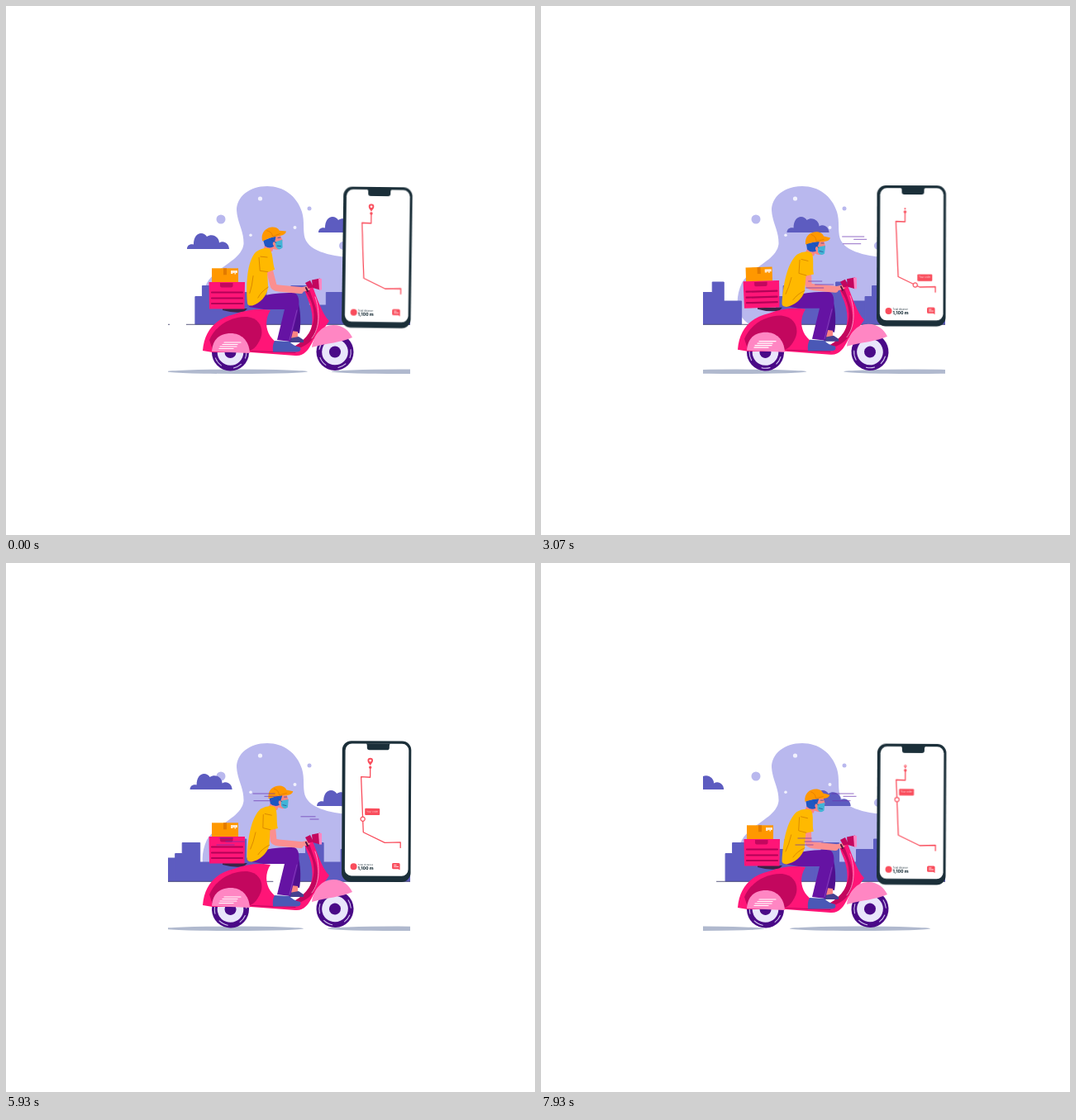
An HTML page for the animation above (8 s loop, 640 by 640 pixels).

```html
<!DOCTYPE html>
<html lang="en">
<head>
<meta charset="utf-8">
<title>Scooter delivery</title>
<style>
  html, body { margin: 0; width: 100%; height: 100%; overflow: hidden; background: #fff; }
  svg { display: block; width: 100%; height: 100%; }
  text { font-family: Inter, Arial, sans-serif; }
  .lav { fill: #b9b8ee; }
  .blue { fill: #5d5cc0; }
  .pink { fill: #ff1577; }
  .dark { fill: #c3075e; }
  .light { fill: #ff86c3; }
  .red { fill: #f94d5c; }
  .skin { fill: #fb8583; }
  .tyre { fill: #4a0a87; }
  .fine { fill: none; stroke-linecap: round; stroke-linejoin: round; }
</style>
</head>
<body>
<svg viewBox="0 0 640 640">
  <defs>
    <clipPath id="view"><rect x="196" y="200" width="293" height="260"/></clipPath>
    <path id="cloud" class="blue" d="M0 19C0 15 3 12.500 8 13.500C8 5 12 0 17 0C20 0 23 2 24 4C31 -1 39 5 39 11.500C44 8 51 12 51 19Z"/>
    <g id="wheel">
      <circle class="tyre" r="22.5"/>
      <circle r="15.8" fill="#e9e6fb"/>
      <circle class="tyre" r="7"/>
      <path class="fine" stroke="#d9ccf5" d="M-18 7A19.3 19.3 0 0 0-11 16M4 18.9A19.3 19.3 0 0 0 13 14.3M18 7A19.3 19.3 0 0 0 19 -3M-19 -3A19.3 19.3 0 0 1-14 -13"/>
    </g>
    <g id="streaksTop"><path d="M0 279h27M14 282.3h16M1 287.7h22"/></g>
    <g id="streaksMid"><path d="M0 306.8h18M11 310h11"/></g>
    <g id="streaksLow"><path d="M0 333h17M8 337h23M-3 341h22"/></g>
  </defs>

  <g clip-path="url(#view)">
    <path class="lav" d="M316 218C294 218 279 231 279 247C280 263 288 272 287.500 288C285 308 255 315 243 335C234 355 236 375 252 385H262C285 382 292 364 318 363L430 366V306C400 303 372 300 363 284C358 274 362 262 358 249C352 230 336 218 316 218Z"/>
    <g class="lav">
      <circle cx="260" cy="258" r="5.5"/><circle cx="367" cy="245" r="2.5"/><circle cx="408" cy="290" r="5"/>
    </g>
    <g fill="#f1f1fd">
      <circle cx="307.5" cy="233" r="2.6"/><circle cx="349.5" cy="268" r="2"/><circle cx="296" cy="277.3" r="1.8"/>
    </g>
    <g id="clouds"></g>
    <g id="town"></g>
    <g id="ground" fill="#b0b9ce"></g>
  </g>

  <g transform="translate(271.5 419)"><use id="rear" href="#wheel"/></g>
  <g transform="translate(398 418.5)"><use id="front" href="#wheel"/></g>

  <g id="bike">
    <path fill="#3a2447" d="M262 366H292L288 370Q276 372 262 368Z"/>
    <g id="cargo">
      <rect x="249" y="317.3" width="32" height="17" fill="#ff9800"/>
      <path fill="#e27a00" d="M263 317.3h4v8h-4z"/>
      <path fill="#ffe9cf" d="M272 320h8v3h-2v1.5h-1.500v-1.500h-2v1h-2.500z"/>
      <path class="pink" d="M245.500 334H289L288.500 366.500H246Z"/>
      <path class="dark" d="M259 335h15.500v3.500q0 2-2 2h-11.500q-2 0-2-2z"/>
      <path class="fine" stroke="#b40258" stroke-width="2.2" d="M249 346.500h37M249 353.500h37M249 360h37"/>
    </g>
    <path class="pink" d="M238 417C240 392 254 378 276 373C292 367 306 366 320 368C310 384 316 402 332 410L350 411C372 402 376 378 364 352L361 343L370 337C376 352 382 372 391 381C384 392 380 396 372 404C366 417 360 424 350 423L296 419L250 419Z"/>
    <path class="dark" d="M246 404C255 384 275 375 292 376C308 378 312 392 308 402C304 412 298 417 292 418L250 416Z"/>
    <path class="light" d="M249 418C250 402 260 396 272 396C284 396 294 404 295 420Z"/>
    <path class="fine" stroke="#fff" stroke-width="1.2" d="M264 407h20M262 409.500h18M259 412h20M258 414.500h17"/>
    <path class="dark" d="M362 345C375 362 381 393 349 412L357 413C378 405 382 382 372 357L367 343Z"/>
    <path class="fine" stroke="#ffb2d8" stroke-width=".8" d="M374 352C380 368 380 390 370 402"/>
    <path class="light" d="M370 413C372 398 382 386 396 386C408 386 415 393 419 401C406 407 388 408 370 413Z"/>
    <path class="fine" stroke="#b40258" stroke-width=".8" d="M297 417.500L350 419.500"/>

    <path fill="#50108f" d="M342 349C356 344 358 380 355 396L344 394Z"/>
    <path class="skin" d="M345 393L353 394L353 403L344 403Z"/>
    <path fill="#45418f" d="M343 402L354 400L360 404V407H342Z"/>
    <path fill="#6513a3" d="M294 364C302 352 312 347 349 347C356 350 355 362 353 370L344 406L328 404L337 367L312 367Z"/>
    <path class="fine" stroke="#8f50c4" stroke-width=".7" d="M352 368L343 404"/>
    <path fill="#4a58b6" d="M325 405L343 406Q347 411 356 413Q358 418 352 418.500H323Q322 410 325 405Z"/>

    <path id="arm" class="fine" stroke="#fb8f90" stroke-width="8"/>
    <path class="fine" stroke="#fb8f90" stroke-width="5.500" d="M354 344L365 341.500"/>
    <g id="torso">
      <path class="skin" d="M323 293L333 297L330 304L319 302Z"/>
      <path fill="#ffb900" d="M291.500 361C293 338 298 312 310 302Q319 297 327 300C331 305 328 318 330 326L320.500 328L319 346C316 357 306 364 297 365.500Q291 365 291.500 361Z"/>
      <path class="fine" stroke="#d98500" stroke-width=".9" d="M313 309L312 325L321 327.500M315 308L323 310M303 330Q300 342 296 350M319 346Q310 350 305 357"/>
      <path class="skin" d="M328 286L342 285L344 292L342 301Q336 305 329 299Z"/>
      <path fill="#1e56c2" d="M321 289L337 286L335 292Q330 293 333 298Q327 301 322 296Z"/>
      <path fill="#42b4d6" d="M335 293L344 291.500L343 301Q338 305 335 299Z"/>
      <path class="fine" stroke="#2a4f93" stroke-width=".8" d="M331 290L336 294M337 298L341 299M339 288.500h3"/>
      <path fill="#ff9800" d="M320 290C318 273 339 271 342 280L350 282Q349 286 342 286.500L330 287Z"/>
      <path class="fine" stroke="#e27a00" stroke-width=".8" d="M327 278Q333 280 333 286L342 284"/>
    </g>
    <path class="dark" d="M370 331.500L380 329.500V343.500L371 341Z"/>
    <path class="light" d="M378 329.500L382 330V343.500L379 343.500Z"/>
    <path class="dark" d="M362 335L368 332L372 340L366 342Z"/>
    <path class="fine" stroke="#4b1745" stroke-width="2" d="M363 341L365 345"/>
  </g>

  <g id="streaks" clip-path="url(#view)" fill="none" stroke="#6a35b0" stroke-width=".9" opacity=".8"></g>

  <g id="phone">
    <rect x="406" y="219" width="83.500" height="170.500" rx="11" fill="#1b2f39"/>
    <rect x="409.800" y="222.300" width="76.700" height="160" rx="8" fill="#fff"/>
    <path fill="#1b2f39" d="M435 222h29q-1 1-1 3v2q0 3-3 3h-21q-3 0-3-3v-2q0-2-1-3z"/>
    <path id="route" class="fine" stroke="#f94d5c" stroke-width="1.300" d="M477 348V341.500L458 342L432 329.500L429 262.500L440 263V251"/>
    <circle class="red" cx="440" cy="251" r="1.700"/>
    <g id="pin">
      <path class="red" d="M0 0C-2-3-3.300-4-3.300-6A3.300 3.300 0 0 1 3.300-6C3.300-4 2-3 0 0Z"/>
      <circle cy="-6" r="1.400" fill="#fff"/>
    </g>
    <circle class="red" cx="420.500" cy="371" r="4"/>
    <text x="425.500" y="369.800" font-size="2.800" fill="#33424c">Total distance</text>
    <text x="425.500" y="374.800" font-size="5.200" font-weight="800" fill="#1b2f39">1,100 m</text>
    <path class="red" d="M468.500 366.500h6.500q1.500 0 1.500 1.500v7l-2-1.200h-6q-1.500 0-1.500-1.500v-4.300q0-1.500 1.500-1.500z"/>
    <path class="fine" stroke="#fff" stroke-width=".8" d="M469.500 369h2.500M469.500 371h5"/>
    <g id="marker">
      <rect class="red" x="2.500" y="-13" width="18" height="8.200" rx="1"/>
      <text x="11.500" y="-8" font-size="2.800" fill="#ffe3e5" text-anchor="middle">Your order</text>
      <circle r="2.600" fill="#fff" stroke="#f94d5c" stroke-width="1.200"/>
    </g>
  </g>
</svg>
<script>
const LOOP = 8000;
const $ = id => document.getElementById(id);
const place = (id, value) => $(id).setAttribute('transform', value);
const range = n => [...Array(n).keys()];
const wave = (t, period) => Math.cos(2 * Math.PI * t / period);
const smooth = x => x * x * (3 - 2 * x);
const clamp = x => Math.max(0, Math.min(1, x));

// Smooth interpolation through [time, value] stops.
function through(stops, t) {
  let i = 0;
  while (i < stops.length - 2 && t > stops[i + 1][0]) i++;
  const [[t0, a], [t1, b]] = [stops[i], stops[i + 1]];
  return a + (b - a) * smooth(clamp((t - t0) / (t1 - t0)));
}

// One row of houses as [right edge, roof height]; each block is two rows.
const houses = [[8.5, 351.5], [30, 338.5], [51, 362], [72, 346.5], [86, 334], [107.4, 357]];
const TOWN = 256.8;
const row = 'M0 385' + houses.map(([x, y]) => `V${y}H${x}`).join('') + 'V385Z';
$('town').innerHTML = range(5).map(i => `<g transform="translate(${229 + (i - 1) * TOWN})">
  <g class="blue" stroke="#5d5cc0" stroke-linejoin="round">
    <path d="${row}"/><path d="${row}" transform="translate(107.4)"/>
  </g>
  <path stroke="#4a4a72" stroke-width=".9" d="M-11 385.300H226"/></g>`).join('');

$('clouds').innerHTML = range(3).map(i =>
  `<use href="#cloud" x="${219 + 312.5 * i}" y="275"/><use href="#cloud" x="${378 + 312.5 * i}" y="255"/>`).join('');

const shadows = [195, 394, 595, 810];
$('ground').innerHTML = range(3).map(i => shadows.map(x =>
  `<ellipse cx="${x + 85 + i * 852}" cy="442.300" rx="85" ry="2.700"/>`).join('')).join('');

$('streaks').innerHTML = '<g id="wind">' + range(5).map(i => {
  const use = (name, x) => `<use href="#${name}" x="${x + i * 329}"/>`;
  return use('streaksTop', 459) + use('streaksMid', 517) + use('streaksLow', 418);
}).join('') + '</g>';

const leanStops = [[0, -8], [1.1, -1.5], [1.79, -1.3], [3.07, 0], [3.93, 0], [5.93, -2], [7.21, -1.3], [8, -0.5]];
const liftStops = [[0, -3], [1.1, -1], [3.93, 0], [5.93, -1], [7.21, -1.3], [8, -1]];
const hip = { x: 298, y: 358 };

function drawRider(t) {
  const lean = through(leanStops, t), lift = through(liftStops, t);
  place('torso', `translate(0 ${lift}) rotate(${lean} ${hip.x} ${hip.y})`);
  const a = lean * Math.PI / 180, dx = 25, dy = -37;
  const x = hip.x + dx * Math.cos(a) - dy * Math.sin(a);
  const y = hip.y + dx * Math.sin(a) + dy * Math.cos(a) + lift;
  $('arm').setAttribute('d', `M${x} ${y}L323.500 338Q324 341 330 341.500L356 344`);
}

function drawPhone(t) {
  const turn = 0.4 + 0.42 * wave(t, 4.6);
  place('phone', `translate(0 ${1.9 * wave(t, 4.1) - 1.9}) rotate(${turn} 448 385)`);
  place('pin', `translate(440 248.800) scale(${0.65 + 0.35 * wave(t, 6)})`);
  const p = $('route').getPointAtLength(Math.max(0, 14 + 13.6 * (t - 1.79)));
  place('marker', `translate(${p.x} ${p.y}) scale(${smooth(clamp((t - 0.4) / 0.35))})`);
}

function render(ms) {
  const t = (ms % LOOP) / 1000;
  place('clouds', `translate(${-26.2 * t})`);
  place('town', `translate(${-65.5 * t})`);
  place('ground', `translate(${-144.5 * t})`);
  place('wind', `translate(${-138 * t})`);
  place('rear', `rotate(${360 * t})`);
  place('front', `rotate(${360 * t})`);
  place('bike', `translate(0 ${1.5 * wave(t, 4) - 1.5})`);
  const tilt = t > 0.5 && t < 4.7 ? -1.8 * Math.sin(Math.PI * (t - 0.5) / 4.2) : 0;
  place('cargo', `rotate(${tilt} 267 366)`);
  drawRider(t);
  drawPhone(t);
}

const start = performance.now();
function tick() {
  render(performance.now() - start);
  requestAnimationFrame(tick);
}
tick();
</script>
</body>
</html>
```
